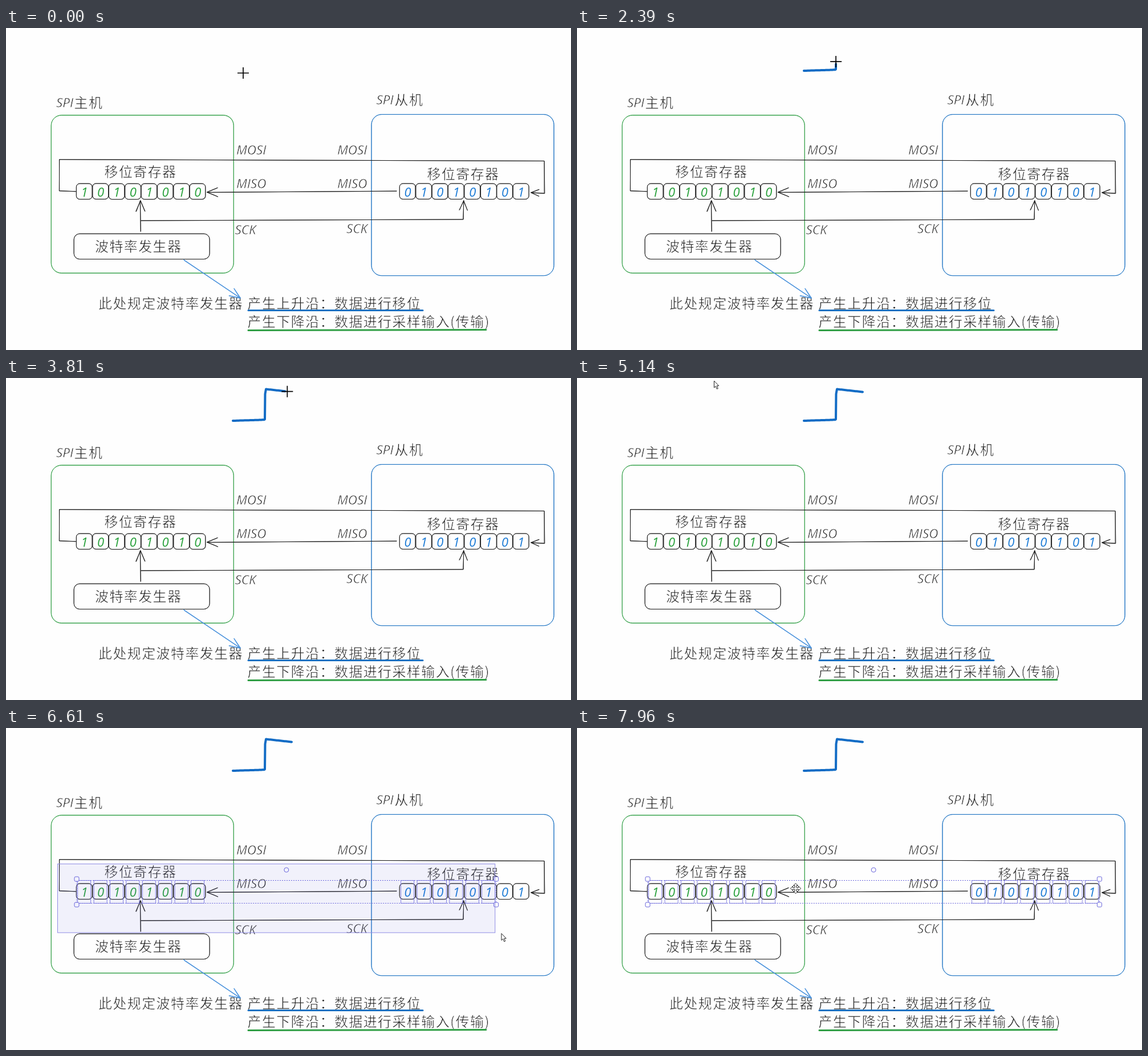
Write an HTML page that moves like this. It is 991 px wide and 565 px high and loops after 7990 ms.

```html
<!DOCTYPE html>
<html lang="zh">
<head>
<meta charset="utf-8">
<style>
html, body { margin: 0; width: 100%; height: 100%; overflow: hidden; background: #fefefe; }
svg { display: block; width: 991px; height: 565px; }
text { fill: #1e1e1e; stroke: #fefefe; stroke-width: .65px; letter-spacing: 1.4px;
  font: 300 24px "Noto Sans CJK SC", "Noto Sans CJK", sans-serif; }
.latin { font: italic 400 22.5px "Open Sans", "Noto Sans", sans-serif; letter-spacing: 0; }
.bit { font: italic 400 22px "Open Sans", "Noto Sans", sans-serif; letter-spacing: 0;
  text-anchor: middle; stroke: none; }
.sketch { fill: none; stroke-linecap: round; stroke-linejoin: round; }
</style>
</head>
<body>
<svg viewBox="0 0 991 565">
  <g id="board"></g>
  <path id="ink" class="sketch" stroke="#126cc5" stroke-width="4"/>
  <g id="picked" fill="none" stroke="#6965db"></g>
  <rect id="band" x="90.5" y="238.5" fill="#6965db" fill-opacity=".085" stroke="#8f8ce4"/>
  <path id="cross" d="M-10 0H10M0-10V10" stroke="#000" stroke-width="1.7"/>
  <path id="arrow" d="M.5.5V12.5L3.2 10L5.3 14.8L7.3 13.9L5.3 9.2H8.8Z" fill="#fff" stroke="#222"/>
  <path id="move" d="M0-9L4-5H1.5V-1.5H5V-4L9 0L5 4V1.5H1.5V5H4L0 9L-4 5H-1.5V1.5H-5V4L-9 0L-5-4V-1.5H-1.5V-5H-4Z"
    fill="#fff" stroke="#222"/>
</svg>
<script>
const LOOP = 7990;
const INK = '#1e1e1e', GREEN = '#2f9e44', BLUE = '#1971c2';
const $ = id => document.getElementById(id);

let seed = 7;
const rand = () => (seed = seed * 16807 % 2147483647) / 2147483647 - 0.5;

function add(parent, tag, attrs, text) {
  const el = document.createElementNS('http://www.w3.org/2000/svg', tag);
  for (const k in attrs) el.setAttribute(k, attrs[k]);
  if (text) el.textContent = text;
  parent.appendChild(el);
  return el;
}

const board = $('board');
const label = (x, y, text, cls = '') => add(board, 'text', { x, y, class: cls }, text);
const stroke = (d, color, width) =>
  add(board, 'path', { d, class: 'sketch', stroke: color, 'stroke-width': width });

// Two slightly wavering passes, like a pen going over a line twice
function line(points, color, width) {
  for (let pass = 0; pass < 2; pass++)
    stroke('M' + points.map(([x, y]) => `${x + rand()} ${y + rand()}`).join('L'), color, width);
}

function arrow(points, head = 20, color = INK, width = 0.95) {
  const [[ax, ay], [x, y]] = points.slice(-2);
  const back = Math.atan2(ay - y, ax - x);
  const arm = turn => [x + head * Math.cos(back + turn), y + head * Math.sin(back + turn)];
  line(points, color, width);
  line([arm(0.4), [x, y], arm(-0.4)], color, width);
}

function box(x, y, width, height, rx, color = INK) {
  for (let pass = 0; pass < 2; pass++)
    add(board, 'rect', { x: x + rand() * 0.7, y: y + rand() * 0.7, width, height, rx,
      fill: 'none', stroke: color, 'stroke-width': 0.85 });
}

const CELL = 28.4;
const centers = [];
function register(x, bits, color) {
  [...bits].forEach((bit, i) => {
    const cx = x + CELL * (i + 0.5);
    centers.push(cx);
    box(cx - 13.9, 273, CELL - 0.6, 27.5, 6);
    add(board, 'text', { x: cx + 0.4, y: 296, class: 'bit', style: `fill:${color}` }, bit);
  });
}

label(88, 139, 'SPI', 'latin');
label(119.5, 140, '主机');
label(649.5, 134, 'SPI', 'latin');
label(681.5, 135, '从机');
label(172.5, 260.5, '移位寄存器');
label(738.5, 265, '移位寄存器');
label(156, 391.5, '波特率发生器');
label(162, 491.5, '此处规定波特率发生器');
label(423.5, 491.5, '产生上升沿：数据进行移位');
label(423.5, 523.5, '产生下降沿：数据进行采样输入(传输)');
for (const x of [404, 581]) {
  label(x, 222, 'MOSI', 'latin');
  label(x, 280.5, 'MISO', 'latin');
}
label(401.5, 362, 'SCK', 'latin');
label(597, 359.5, 'SCK', 'latin');

box(79.5, 153, 320, 277, 18, GREEN);
box(641, 151.5, 320, 283, 18, BLUE);
box(119, 361, 238, 44.5, 10);
register(123, '10101010', '#27a03a');
register(690, '01010101', '#1c7bd6');

arrow([[122, 287], [93.5, 286], [93.5, 230.5], [944.5, 233], [944.5, 290], [921, 289]], 15);
arrow([[685, 286.3], [353, 288]]);
arrow([[236.5, 357], [235.5, 303]]);
arrow([[237, 338], [802, 336], [802.5, 303]], 18);
arrow([[312, 407], [411, 474]], 20, '#4a92dc', 1.2);
stroke('M425 495.5H731', BLUE, 3);
stroke('M425 530.5L842 529.5', GREEN, 3);

// A track is a start point followed by moves: [from, to, x, y, ease]
const linear = f => f;
const smooth = f => f * f * (3 - 2 * f);
const slowing = f => 1 - (1 - f) ** 1.5;

function track(x, y, moves) {
  return t => {
    let px = x, py = y;
    for (const [from, to, nx, ny, ease = linear] of moves) {
      if (t < from) break;
      const f = ease(Math.min(1, (t - from) / (to - from)));
      px += (nx - px) * f;
      py += (ny - py) * f;
    }
    return [px, py];
  };
}

const INK_START = 1070, INK_END = 3930, INK_LAG = 60;
const pen = track(416, 79, [
  [20, 80, 425, 60],
  [310, 890, 398, 75, smooth],
  [1210, 1930, 447, 73.5, slowing],
  [2030, 2200, 454, 73],
  [2200, 2810, 454.5, 28],
  [2830, 2940, 456, 19.5],
  [3230, 3930, 501, 24.5],
  [4150, 4330, 468, -12]]);

const BAND_START = 5980, BAND_END = 6770;
const mouse = track(240, 4.5, [
  [5140, 5880, 91, 238, smooth],
  [5980, 6180, 136, 265],
  [6180, 6610, 868, 360],
  [6610, 6770, 945, 361],
  [6890, 7600, 480, 304, smooth],
  [7700, 7960, 383.5, 281.5]]);

// The band trails the pointer and catches up as the drag ends
function bandCorner(t) {
  const left = Math.max(0, (BAND_END - t) / (BAND_END - BAND_START));
  return mouse(Math.max(BAND_START, Math.min(t, BAND_END) - 180 * left * left));
}

function trail(t) {
  const end = Math.min(t - INK_LAG, INK_END);
  const points = [pen(INK_START)];
  for (let s = INK_START; s < end; s += 30) points.push(pen(s));
  points.push(pen(Math.max(INK_START, end)));
  return 'M' + points.map(p => p.join(' ')).join('L');
}

const picked = $('picked');
const frames = centers.map(c =>
  add(picked, 'rect', { x: c - 11.5, y: 267.5, width: 23, height: 40, 'stroke-width': 0.8 }));
const outline = add(picked, 'rect', { y: 267.5, height: 40, 'stroke-dasharray': '2 2' });
const handles = [265, 265, 310, 310].map(y =>
  add(picked, 'rect', { y: y - 4, width: 8, height: 8, rx: 2, fill: '#fff' }));
const knob = add(picked, 'circle', { cy: 249, r: 4, fill: '#fff' });

const show = (el, on) => { el.style.display = on ? '' : 'none'; };
const place = (el, [x, y]) => el.setAttribute('transform', `translate(${x} ${y})`);

function select(count) {
  show(picked, count);
  if (!count) return;
  frames.forEach((el, i) => show(el, i < count));
  const left = centers[0] - 13.2, right = centers[count - 1] + 13.4;
  outline.setAttribute('x', left);
  outline.setAttribute('width', right - left);
  handles.forEach((el, i) => el.setAttribute('x', (i % 2 ? right : left) - 4));
  knob.setAttribute('cx', (left + right) / 2);
}

function draw(t) {
  show($('cross'), t < 4330);
  place($('cross'), pen(t));
  show($('ink'), t >= INK_START);
  $('ink').setAttribute('d', trail(t));

  const tip = mouse(t);
  const moving = t > 6890 && tip[1] < 310;
  show($('arrow'), t >= 5140 && !moving);
  show($('move'), moving);
  place(moving ? $('move') : $('arrow'), tip);

  const [bx, by] = bandCorner(t);
  show($('band'), t >= BAND_START && t < 6890);
  $('band').setAttribute('width', Math.max(0, bx - 90));
  $('band').setAttribute('height', Math.max(0, by - 238));
  select(t >= BAND_START && by > 303 ? centers.filter(c => c + 7 <= bx).length : 0);
}

const start = performance.now();
function tick() {
  draw((performance.now() - start) % LOOP);
  requestAnimationFrame(tick);
}
tick();
</script>
</body>
</html>
```
